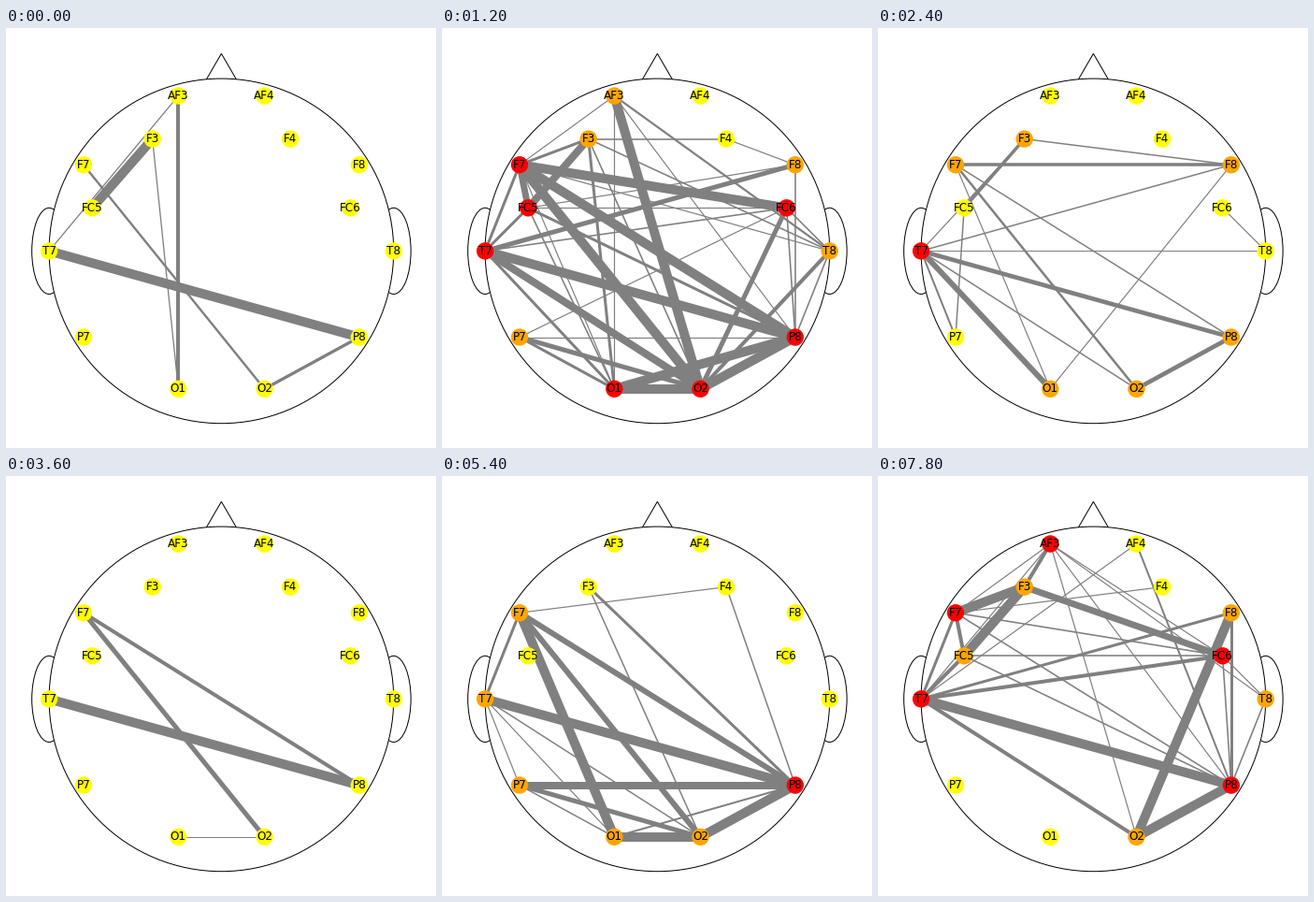
A matplotlib script that plays this animation: 460x449 px, repeating every 8000 ms.

```python
import matplotlib.pyplot as plt
from matplotlib.animation import FuncAnimation
from matplotlib.patches import Circle, Ellipse, Polygon

W, H, DPI = 460, 449, 64
PT = 72 / DPI  # points per pixel
CX, CY, R = 230.4, 238.4, 184.3
STEP, TICK, LOOP = 300, 100, 8000

# Left-hemisphere electrodes in head radii, each with its mirrored partner.
LEFT = {
    ("AF3", "AF4"): (0.25, 0.9), ("F3", "F4"): (0.4, 0.65),
    ("F7", "F8"): (0.8, 0.5), ("FC5", "FC6"): (0.75, 0.25),
    ("T7", "T8"): (1, 0), ("P7", "P8"): (0.8, -0.5),
    ("O1", "O2"): (0.25, -0.8),
}
POS = {}
for (left, right), (dx, dy) in LEFT.items():
    POS[left] = (CX - dx * R, CY - dy * R)
    POS[right] = (CX + dx * R, CY - dy * R)

# Time step -> line width in pixels -> connected pairs.
GRAPHS = {
    0: {10: "F3-FC5 T7-P8", 4: "AF3-O1", 3.3: "O2-P8", 2.4: "F7-O2",
        1.3: "AF3-T7 F3-O1"},
    4: {10: "AF3-O2 F7-FC6 F7-P8 F7-O2 T7-P8 O1-O2 O2-P8 O1-P8",
        8: "F3-FC5 T7-O2", 7: "F7-FC5", 5: "T7-F8 FC6-O2 P7-O2",
        4: "T8-O2", 3: "F3-F7 F7-T7 FC5-P8 T7-O1 P7-O1 F3-O1 FC5-T7",
        2.2: "AF3-T8",
        1.6: "F3-F4 F3-T8 F3-O2 FC5-O1 T7-FC6 F8-P8 FC6-P8 FC6-T8 T8-P8",
        1.2: "AF3-F7 AF3-O1 AF3-P8 F4-F8 F7-T8 F7-O1 FC5-F8 FC5-FC6 "
             "P7-FC6 P7-P8"},
    8: {6: "T7-O1", 4.7: "T7-P8 O2-P8", 3.5: "F3-FC5 F7-F8", 2.5: "F7-O2",
        2: "T7-P7", 1.5: "F3-F8 F7-P8 FC5-P7 T7-F8 T7-O2",
        1.2: "F3-T7 F7-O1 F8-O1 FC6-T8", 1: "T7-T8"},
    12: {10: "T7-P8", 5: "F7-O2", 4: "F7-P8", 1: "O1-O2"},
    18: {10: "F7-O1 T7-P8 O1-O2 O2-P8", 8: "P7-P8", 6: "F7-O2 F7-P8",
         5: "P7-O2", 3: "F7-T7 F3-P8", 2: "O1-P8",
         1.5: "F3-O2 T7-O2 F4-P8 P7-O1", 1.2: "F4-F7 T7-P7 T7-O1"},
    22: {10: "F3-FC5 T7-P8", 4.5: "T7-O2", 4: "O2-P8", 3: "AF4-T7",
         2.4: "F3-F7 F7-FC5", 2: "FC6-O2", 1.7: "T7-FC6",
         1.2: "AF4-P8 FC5-T7"},
    26: {10: "F3-F7 F3-FC5 T7-P8 F8-O2 O2-P8", 7: "F3-FC6",
         4: "F7-FC5 AF3-F3 FC5-T7 T7-FC6 T7-O2", 3: "F7-T7 T7-F8 F8-P8",
         2: "AF4-P8", 1.6: "FC5-FC6 FC5-P8 F7-FC6 F7-P8 FC6-P8 T8-P8",
         1.2: "AF3-F7 AF3-T7 AF3-FC6 AF3-T8 AF3-O2 AF3-P8 AF4-T7 F4-F7 "
              "FC6-T8"},
}


def edge_widths(graph):
    return {frozenset(pair.split("-")): width
            for width, pairs in graph.items() for pair in pairs.split()}


KEYS = {step: edge_widths(graph) for step, graph in GRAPHS.items()}


def widths_at(step):
    """Blend the neighbouring graphs and keep links at least a pixel wide."""
    before = max(k for k in KEYS if k <= step)
    after = min(k for k in KEYS if k >= step)
    t = (step - before) / max(after - before, 1)
    a, b = KEYS[before], KEYS[after]
    mixed = {e: a.get(e, 0) * (1 - t) + b.get(e, 0) * t for e in {*a, *b}}
    return {e: w for e, w in mixed.items() if w >= 1}


def degree_color(degree):
    return "red" if degree >= 7 else "orange" if degree >= 3 else "yellow"


fig = plt.figure(figsize=(W / DPI, H / DPI), dpi=DPI, facecolor="white")
ax = fig.add_axes((0, 0, 1, 1))
ax.set(xlim=(0, W), ylim=(H, 0))
ax.axis("off")

outline = dict(facecolor="white", edgecolor="black", linewidth=PT)
for x in (CX - R, CX + R):
    ax.add_patch(Ellipse((x, CY), 0.2 * R, 0.5 * R, zorder=0, **outline))
nose = [(CX - 0.09 * R, CY - 0.99 * R), (CX, CY - 1.145 * R),
        (CX + 0.09 * R, CY - 0.99 * R)]
ax.add_patch(Polygon(nose, zorder=0, **outline))
ax.add_patch(Circle((CX, CY), R, zorder=1, **outline))

lines = {}
for edge in sorted({e for key in KEYS.values() for e in key}, key=sorted):
    xs, ys = zip(*(POS[name] for name in sorted(edge)))
    lines[edge], = ax.plot(xs, ys, color="gray", zorder=2,
                           solid_capstyle="butt")

nodes = {}
for name, (x, y) in POS.items():
    nodes[name] = ax.add_patch(Circle((x, y), 9.2, linewidth=0, zorder=3))
    ax.text(x, y, name, fontsize=12 * PT, family="DejaVu Sans",
            ha="center", va="center", zorder=4)


def update(frame):
    widths = widths_at(frame * TICK // STEP)
    for edge, line in lines.items():
        line.set_visible(edge in widths)
        line.set_linewidth(widths.get(edge, 0) * PT)
    for name, node in nodes.items():
        node.set_facecolor(degree_color(sum(name in e for e in widths)))
    return [*lines.values(), *nodes.values()]


anim = FuncAnimation(fig, update, frames=LOOP // TICK, interval=TICK,
                     repeat=True, repeat_delay=0)
plt.show()
```
